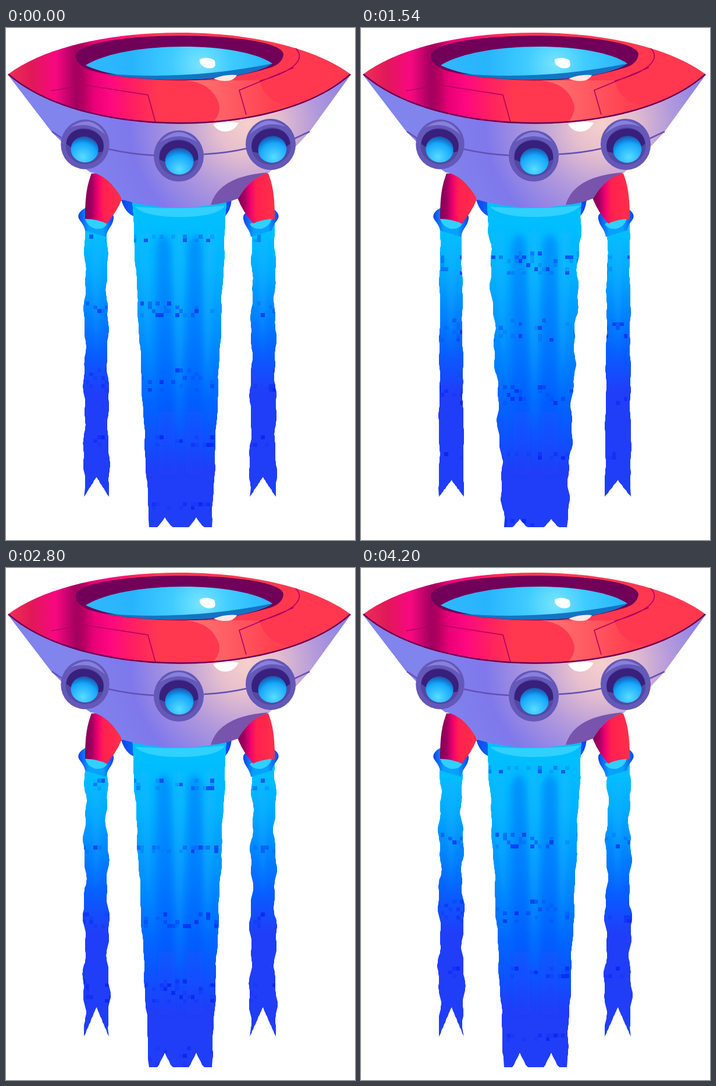
These frames come from a looping animation (600 by 880 pixels, 4.34 s). An HTML page:

```html
<!DOCTYPE html>
<html lang="en">
<head>
<meta charset="utf-8">
<title>Flying saucer</title>
<style>
  html, body { margin: 0; width: 100%; height: 100%; overflow: hidden; background: #fff; }
  svg { display: block; }
</style>
</head>
<body>
<svg width="600" height="880" viewBox="0 0 600 880">
  <defs>
    <linearGradient id="mainJet" gradientUnits="userSpaceOnUse" x1="0" y1="300" x2="0" y2="860">
      <stop offset=".05" stop-color="#00bfff"/><stop offset=".2" stop-color="#00b4ff"/>
      <stop offset=".4" stop-color="#0090ff"/><stop offset=".6" stop-color="#0068ff"/>
      <stop offset=".73" stop-color="#1050ff"/><stop offset=".82" stop-color="#203ef8"/>
    </linearGradient>
    <linearGradient id="sideJet" gradientUnits="userSpaceOnUse" x1="0" y1="330" x2="0" y2="660">
      <stop offset=".08" stop-color="#00bfff"/><stop offset=".28" stop-color="#00a8ff"/>
      <stop offset=".5" stop-color="#0080ff"/><stop offset=".7" stop-color="#085cff"/>
      <stop offset=".9" stop-color="#203ef8"/>
    </linearGradient>
    <linearGradient id="streak" x1="0" y1="0" x2="0" y2="1">
      <stop offset="0" stop-color="#0078f8" stop-opacity=".55"/>
      <stop offset=".5" stop-color="#0060ff" stop-opacity=".45"/>
      <stop offset="1" stop-color="#203ef8" stop-opacity=".4"/>
    </linearGradient>
    <radialGradient id="hull" gradientUnits="userSpaceOnUse" cx="415" cy="165" r="290">
      <stop offset="0" stop-color="#f6d0cc"/><stop offset=".18" stop-color="#e6bfce"/>
      <stop offset=".4" stop-color="#b59bdb"/><stop offset=".7" stop-color="#7f78ec"/>
      <stop offset="1" stop-color="#8084ec"/>
    </radialGradient>
    <linearGradient id="deck" gradientUnits="userSpaceOnUse" x1="3" y1="0" x2="593" y2="0">
      <stop offset="0" stop-color="#f03058"/><stop offset=".07" stop-color="#e01858"/>
      <stop offset=".14" stop-color="#f80880"/><stop offset=".2" stop-color="#a00060"/>
      <stop offset=".22" stop-color="#b40060"/><stop offset=".25" stop-color="#e80078"/>
      <stop offset=".3" stop-color="#ff0880"/><stop offset=".37" stop-color="#ff2060"/>
      <stop offset=".44" stop-color="#ff3850"/>
    </linearGradient>
    <linearGradient id="gloss" gradientUnits="userSpaceOnUse" x1="330" y1="0" x2="460" y2="0">
      <stop offset="0" stop-color="#ff7070"/><stop offset="1" stop-color="#ff4050"/>
    </linearGradient>
    <radialGradient id="glass" gradientUnits="userSpaceOnUse" cx="335" cy="62" r="200">
      <stop offset="0" stop-color="#78e4ff"/><stop offset=".25" stop-color="#40ccff"/>
      <stop offset=".6" stop-color="#28b4fc"/><stop offset="1" stop-color="#30b8ff"/>
    </radialGradient>
    <radialGradient id="lens" cy=".8" r=".8">
      <stop offset="0" stop-color="#58dcff"/><stop offset=".65" stop-color="#18a8fc"/>
      <stop offset=".8" stop-color="#1084dc"/><stop offset="1" stop-color="#2050a8"/>
    </radialGradient>
    <linearGradient id="leg">
      <stop offset="0" stop-color="#800058"/><stop offset=".18" stop-color="#a00060"/>
      <stop offset=".34" stop-color="#f00070"/><stop offset=".5" stop-color="#ff2050"/>
      <stop offset="1" stop-color="#ff3048"/>
    </linearGradient>
    <linearGradient id="mirrorLeg" href="#leg" x1="1" x2="0"/>
    <linearGradient id="bowl">
      <stop offset="0" stop-color="#1040f0"/><stop offset=".3" stop-color="#08a0ff"/>
      <stop offset=".7" stop-color="#08a0ff"/><stop offset="1" stop-color="#1040f0"/>
    </linearGradient>
    <filter id="soft" x="-1" width="3"><feGaussianBlur stdDeviation="6"/></filter>
    <clipPath id="jets"><path id="outline"/></clipPath>
    <clipPath id="deckClip"><use href="#deckShape"/></clipPath>
    <g id="port">
      <ellipse rx="43" ry="44" fill="#6458b8"/>
      <path d="M-32-24Q0-58 32-24Q0-44-32-24" fill="#8880dc"/>
      <ellipse cy="3" rx="34" ry="32" fill="#5448a4"/>
      <path d="M-33 6C-38-38 38-38 33 6L24 10H-24Z" fill="#38207c"/>
      <ellipse cx="1" cy="9" rx="24.5" ry="23" fill="url(#lens)"/>
    </g>
    <g id="nozzle">
      <path d="M137 309C125 315 122 323 126 329C130 335 134 339 136 348L172 359C174 346 182 341 184 332C187 323 184 319 179 317Z" fill="url(#bowl)"/>
      <path d="M136 328Q157 326 174 337Q168 347 153 345Q140 341 136 328" fill="#30d0ff"/>
    </g>
    <path id="legShape" d="M147 250C137 275 136 300 136 328Q155 328 173 336Q191 316 200 292C195 268 185 254 171 249Z"/>
  </defs>

  <path d="M198 295Q204 316 218 323L377 323Q386 314 388 295Z" fill="url(#bowl)"/>
  <g clip-path="url(#jets)">
    <path d="M120 300H190V880H120ZM410 300H480V880H410Z" fill="url(#sideJet)"/>
    <path d="M200 290H400V880H200Z" fill="url(#mainJet)"/>
    <g filter="url(#soft)">
      <path d="M258 375Q271 335 284 375L291 765H263ZM312 375Q324 335 338 375L338 765H310Z" fill="url(#streak)"/>
      <path d="M290 350H305L298 710ZM342 350H360L345 640ZM229 350H243L249 640Z" fill="#20b8ff" opacity=".45"/>
      <path d="M148 365H162L155 575ZM434 365H448L441 575Z" fill="#20b4ff" opacity=".5"/>
    </g>
    <g id="scroll" shape-rendering="crispEdges">
      <g id="cells" fill="#0018f0"></g>
      <use href="#cells" y="1035"/>
    </g>
  </g>
  <use href="#nozzle"/>
  <use href="#nozzle" transform="matrix(-1 0 0 1 593 0)"/>
  <use href="#legShape" fill="url(#leg)"/>
  <use href="#legShape" fill="url(#mirrorLeg)" transform="matrix(-1 0 0 1 598 0)"/>
  <path d="M222 307Q298 313 377 305Q365 324 298 325Q237 324 222 307" fill="#30d0ff"/>

  <path d="M3 80L78 178L95 195Q101 214 114 226L145 248Q176 252 200 295Q300 324 399 293Q420 256 453 248L498 204L522 178L593 80Z" fill="url(#hull)"/>
  <path d="M352 304Q366 254 453 248Q418 258 399 293Q377 302 352 304" fill="#7854ac"/>
  <path d="M79 178L97 190M176 208Q215 217 256 219M340 217Q380 215 414 207M496 190L522 178" fill="none" stroke="#6450b4" stroke-width="2.5"/>
  <path d="M356 165Q376 158 400 163Q391 179 375 178Q362 177 356 165" fill="#fff"/>

  <path id="deckShape" d="M3 80C130-16 466-16 593 80C470 193 130 193 3 80" fill="url(#deck)"/>
  <g clip-path="url(#deckClip)">
    <path d="M309 90Q354 94 366 130Q371 149 351 167H455Q493 150 510 120Q452 130 435 90Z" fill="url(#gloss)"/>
    <path d="M436 91Q502 74 507 40L593 80L505 137Q446 133 436 91" fill="#ff3850"/>
    <path d="M135 98L244 115L257 162M135 98L78 108M495 68L401 107L413 149M455 17C520 30 528 66 436 91" fill="none" stroke="#b00060" stroke-width="1.6"/>
    <path d="M3 80C130 193 470 193 593 80" fill="none" stroke="#680058" stroke-width="5"/>
  </g>
  <path d="M120 48C120 2 477 2 477 46Q475 61 455 68Q380 91 298 90Q195 88 143 72Q120 62 120 48" fill="#700058"/>
  <path d="M137 64C205 22 400 22 458 61C405 97 200 97 137 64" fill="url(#glass)"/>
  <path d="M169 78Q310 91 458 61C409 94 250 95 169 78" fill="#1474c4"/>
  <path d="M333 54Q345 48 358 55Q365 71 346 69Q332 65 333 54" fill="#fff"/>
  <path d="M357 87Q378 79 397 81Q392 91 377 91Q366 91 357 87" fill="#ffe8e8"/>

  <use href="#port" transform="translate(136 200) rotate(12) scale(.97)"/>
  <use href="#port" x="297" y="220"/>
  <use href="#port" transform="translate(455 200) rotate(-12)"/>
</svg>
<script>
const STEP = 140, FRAMES = 31, FALL = 34, PERIOD = 1035, BANDS = 9, CELL = 6.7;
const el = id => document.getElementById(id);
const mix = (a, b, t) => a + (b - a) * t;

// Each jet tapers from its top span to its bottom span; the end is cut by pointed notches.
const side = { top: 330, end: 806, notches: 1, depth: 34, sharp: 2 };
const jets = [
  { ...side, from: [136, 173], to: [134, 177] },
  { ...side, from: [424, 462], to: [419, 464] },
  { top: 296, end: 858, notches: 2, depth: 17, sharp: 4.5, from: [217, 379], to: [246, 354] },
];
// How deep the notches are and how much the side and centre edges ripple.
const calm = { notch: 1, side: 1.6, centre: .8 };
const pinched = { notch: 1.5, side: 2.2, centre: 1 };
const ragged = { notch: .85, side: .8, centre: 2.2 };
const poses = [calm, pinched, pinched, ragged].map((pose, phase) =>
  jets.map(jet => outline(jet, pose, phase)).join(""));

function outline(jet, pose, phase) {
  const ripple = jet.notches > 1 ? pose.centre : pose.side;
  const edge = (k, y) => {
    const t = (y - jet.top) / (jet.end - jet.top), turn = phase + k * 2 + jet.from[0];
    const wave = Math.sin(y / 19 + turn) + .6 * Math.sin(y / 7.3 + turn * 2);
    return mix(jet.from[k], jet.to[k], t) + ripple * wave * Math.min(1, t * 8);
  };
  const left = [], right = [], tip = [];
  for (let y = jet.top; y < jet.end - 12; y += 4) {
    left.push([edge(0, y), y]);
    right.unshift([edge(1, y), y]);
  }
  for (let f = 0; f <= 1; f += 1 / 32) {
    const off = Math.abs(f * jet.notches % 1 - .5) * jet.sharp;
    tip.push([mix(...jet.to, f), jet.end - jet.depth * pose.notch * Math.max(0, 1 - off)]);
  }
  return `M${[...left, ...tip, ...right].map(p => p.map(Math.round)).join("L")}Z`;
}

// Evenly spaced bands of pixel squares.
let seed = 11;
const random = () => (seed = seed * 16807 % 2147483647) / 2147483647;
const shades = [.15, .35, .6], squares = shades.map(() => "");
for (let band = 0; band < BANDS; band++) {
  const top = band * PERIOD / BANDS - 680, rows = 2 + Math.floor(random() * 6);
  for (let r = 0; r < rows; r++)
    for (let x = 130; x < 470; x += CELL)
      if (random() < .14 + .3 / rows)
        squares[Math.floor(random() ** 1.3 * 3)] += `M${x} ${top + r * CELL}h${CELL}v${CELL}h-${CELL}z`;
}
el("cells").innerHTML = squares.map((d, i) => `<path d="${d}" opacity="${shades[i]}"/>`).join("");

function draw(now) {
  const frame = Math.floor(now / STEP) % FRAMES;
  // The flow runs slightly ahead around the middle of the loop.
  const flow = frame + Math.max(0, 1 - Math.abs(frame - 17) / 6);
  el("outline").setAttribute("d", poses[Math.round(flow) % poses.length]);
  el("scroll").setAttribute("transform", `translate(0 ${Math.round(flow * FALL)})`);
  requestAnimationFrame(draw);
}
draw(0);
</script>
</body>
</html>
```
